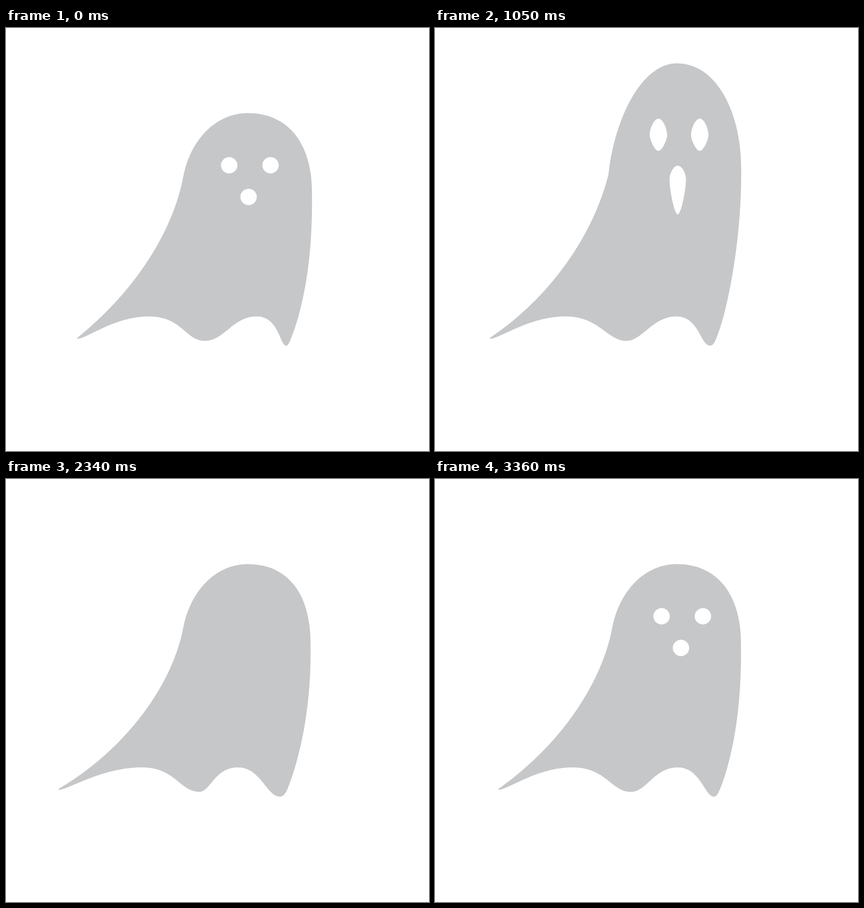
Write an HTML page that moves like this. It is 748 px wide and 748 px high and loops after 3.39 s.

```html
<!DOCTYPE html>
<html lang="en">
<head>
<meta charset="utf-8">
<title>Ghost</title>
<style>
  html, body { margin: 0; width: 100%; height: 100%; overflow: hidden; background: #fff; }
  svg { display: block; width: 100vw; height: 100vh; }
</style>
</head>
<body>
<svg viewBox="0 0 748 748">
  <path id="body" fill="#c6c7c9"/>
  <path id="face" fill="#fff"/>
</svg>
<script>
const LOOP = 3390, STEP = 30, TOP = 150.4;
const body = document.getElementById('body');
const face = document.getElementById('face');

// Smooth monotone curve through [time, value, time, value, ...], flat at both ends.
function track(...keys) {
  const n = keys.length / 2;
  const T = i => keys[2 * i], V = i => keys[2 * i + 1];
  const rise = i => (V(i + 1) - V(i)) / (T(i + 1) - T(i));
  const slope = i => {
    if (i === 0 || i === n - 1) return 0;
    const a = rise(i - 1), b = rise(i);
    return a * b <= 0 ? 0 : 2 * a * b / (a + b);
  };
  return t => {
    if (t <= T(0)) return V(0);
    if (t >= T(n - 1)) return V(n - 1);
    let i = 0;
    while (t >= T(i + 1)) i++;
    const h = T(i + 1) - T(i), u = (t - T(i)) / h, w = 1 - u;
    return V(i) * w * w * (1 + 2 * u) + V(i + 1) * u * u * (3 - 2 * u)
      + h * u * w * (w * slope(i) - u * slope(i + 1));
  };
}

const headTop = track(0, TOP, 540, 62, 765, 29, 1080, 67, 1320, 108.3, 1620, TOP);
const kink = track(810, 0, 1320, 1, 1620, 0);
const lift = track(0, 0, 540, .73, 765, 1, 1320, .56, 1620, 0);
const gape = track(0, 0, 540, .73, 765, 1, 1320, 0);
const sideX = track(1650, 541, 2340, 538.5, 2700, 541);
const swing = track(0, 0, 270, 1.03, 540, 0, 750, 0, 1035, .5, 1320, 0, 1530, 1, 1665, 0,
  1800, 1, 2070, 0, 2340, 1, 2850, 0, 3255, 1.02, 3360, .42, 3390, 0);
const drag = track(480, 0, 750, .48, 1320, 1, 1590, 0);
const exitX = track(1590, 0, 1800, -44.3, 2250, -190);
const enterX = track(2520, 230, 2850, 138.5, 3360, 6, 3390, 0);

const stretch = t => (TOP - headTop(t)) / 121;
const curve = (...p) => 'C' + p.map(v => v.toFixed(2)).join(' ');

function bodyPath(t) {
  const top = headTop(t), up = stretch(t), k = kink(t);
  const lx = 313 - 2 * up - 10.3 * k, ly = 265 - 43 * up + 55 * k;
  const rx = sideX(t) + .5 * up, ry = 290 - 53 * up - 11.6 * k;
  const q = .6 - .17 * up + .045 * k;

  // Hem: tip, two arches and two lobes.
  const a = swing(t), c = drag(t), bow = a * (1 - a);
  const tip = 126 - 33 * a - 15 * c;
  const arch1 = 252 - 12 * (a + 1.35 * bow) - 13 * c;
  const lobe1 = 352 - 10 * (a + .5 * bow) - 8 * c;
  const arch2 = 443 - 32.5 * a;
  const lobe2 = 495.5 - 11 * (a - .95 * bow) - 7 * c;
  const lean = 443 - arch2, ex = lobe2 + 10 + .14 * lean;

  return `M${tip} 548`
    + curve(tip + (.51 + .015 * a) * (lx - tip), 471 + 9 * a, 2 * lx - 333, ly - .363 * (ly - 548), lx, ly)
    + curve(lx + 13 - up - 4 * k, ly - q * (ly - top), 372 - 4 * up - 9 * k, top, 427.5, top)
    + curve(501, top, rx, ry - q * (ry - top), rx, ry)
    + curve(rx + 2, ry + 112, ex + 22, 488, ex, 545)
    + curve(ex - 4, 555, lobe2 + 4 + .08 * lean, 561.7, lobe2, 561.7)
    + curve(lobe2 - 11.5 - .37 * lean, 561.7, arch2 + 40, 510, arch2, 510)
    + curve(arch2 - 42, 510, lobe1 + 34 - .44 * lean, 553.3, lobe1, 553.3)
    + curve(lobe1 - 35, 553.3, arch1 + 60, 510, arch1, 510)
    + curve(arch1 - .48 * (arch1 - tip), 510, tip + 16, 550, tip + 1, 549.5)
    + curve(tip - .5, 549.5, tip - .5, 548.8, tip, 548) + 'Z';
}

// Hole with its widest point at mid; up and down set how full the sides are.
function hole(x, top, mid, low, r, up, down, tipW) {
  const yu = mid - up * (mid - top), yd = mid + down * (low - mid), w = 8;
  return `M${x} ${top}`
    + curve(x + w, top, x + r, yu, x + r, mid)
    + curve(x + r, yd, x + tipW, low, x, low)
    + curve(x - tipW, low, x - r, yd, x - r, mid)
    + curve(x - r, yu, x - w, top, x, top) + 'Z';
}

function facePath(t) {
  const f = lift(t), k = kink(t), up = stretch(t);
  const dx = t < 2400 ? exitX(t) : enterX(t);
  const full = .55 - .25 * up, low = .55 - .27 * f, tipW = 8 - f - 1.4 * k;
  const eye = x => hole(x + dx + .5 * f, 228.2 - 80 * f, 242.7 - 60 * f - 6 * k, 257.2 - 47 * f,
    14.5 + 1.75 * up * up, full, low, tipW);
  return eye(394.7) + eye(467.8)
    + hole(429 + dx + .3 * f, 284.2 - 48 * f, 298.7 - 31.5 * f - 9.9 * k, 313.2 + 34 * gape(t),
      14.5, .55 - .2 * up, low, 8 - 2 * f - k);
}

function draw(now) {
  const t = Math.floor((now % LOOP) / STEP) * STEP;
  body.setAttribute('d', bodyPath(t));
  face.setAttribute('d', facePath(t));
}

function tick() {
  draw(performance.now());
  requestAnimationFrame(tick);
}
tick();
</script>
</body>
</html>
```
